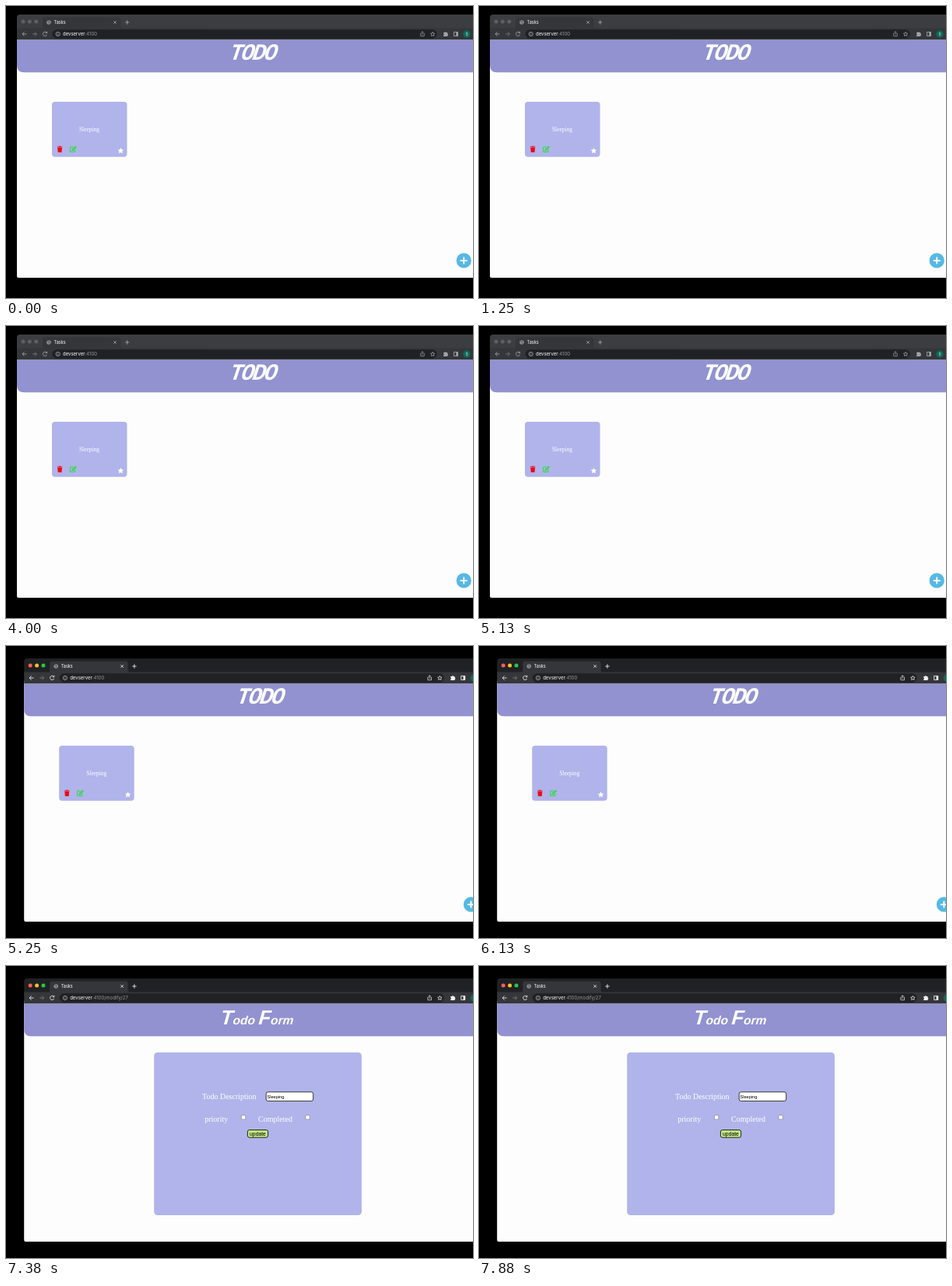
Animation, 600 px wide and 375 px high, one loop 8 s. Source, as an HTML page:

```html
<!DOCTYPE html>
<html lang="en">
<head>
<meta charset="utf-8">
<title>Todo list</title>
<style>
html, body { margin: 0; width: 100%; height: 100%; overflow: hidden; background: #000; }
svg { display: block; width: 100vw; height: 100vh; }
text { fill: #fff; }
.ui { font-family: Inter, sans-serif; }
.serif { font-family: "Liberation Serif", serif; }
.sans { font-family: "Liberation Sans", sans-serif; }
.title { font-style: italic; font-weight: 700; text-anchor: middle; }
.list-title { font: italic 700 27.5px "Noto Sans Mono", monospace; letter-spacing: -1.7px; }
.form-title { font-family: "Liberation Sans", sans-serif; font-size: 15.5px; }
.form-title .cap { font-size: 26px; }
.strip { fill: #3c3d40; }
.light { fill: #5e5f62; }
.icon { stroke: #a0a2a6; fill: none; stroke-width: .9; }
.solid { fill: #a0a2a6; }
.active .strip { fill: #202124; }
.active .red { fill: #ff5f57; }
.active .yellow { fill: #febc2e; }
.active .green { fill: #28c840; }
.active .icon.lit { stroke: #e6e7e9; }
.active .solid.lit { fill: #f1f1f2; }
.dim { stroke: #77797d; }
.panel { fill: #b0b4ea; }
.hover .card { filter: drop-shadow(0 0 2px #0005); }
.field { fill: #fff; stroke: #333; }
.check { fill: #fff; stroke: #777; stroke-width: .6; }
</style>
</head>
<body>
<svg viewBox="0 0 600 375" preserveAspectRatio="none">
  <g id="window">
    <path fill="#fdfdfd" d="M14 40H620V349H16q-2 0-2-2Z"/>
    <path class="strip" d="M14 30V15q0-4 4-4H620V30Z"/>
    <circle class="light red" cx="22" cy="20" r="2.5"/>
    <circle class="light yellow" cx="30.4" cy="20" r="2.5"/>
    <circle class="light green" cx="38.8" cy="20" r="2.5"/>
    <path fill="#35363a" d="M14 28.5H45q2 0 2-2V18q0-3.5 3.5-3.5H144q3.5 0 3.5 3.5v8.500q0 2 2 2H620V43.500H14Z"/>
    <circle cx="55" cy="21" r="2.8" fill="#8f9195"/>
    <path d="M53 20l2-1 1 2-2 1M55.500 23l1.500-1" fill="none" stroke="#45464a" stroke-width=".7"/>
    <text class="ui" x="61.500" y="23" font-size="5.5">Tasks</text>
    <path class="icon lit" d="M138.300 19.300l3.400 3.400m0-3.400l-3.400 3.400M153 21h5.400m-2.700-2.700v5.400"/>

    <path class="icon lit" d="M26.400 36H21m2.500-2.600L20.900 36l2.600 2.600"/>
    <path class="icon dim" d="M34 36h5.400m-2.500-2.600l2.600 2.600-2.600 2.600"/>
    <path class="icon lit" d="M52.200 34.400a2.600 2.600 0 1 0 .3 2.400M52.600 32.800v2h-2"/>
    <rect x="59.500" y="30.300" width="494" height="11.400" rx="5.700" fill="#202124"/>
    <g class="icon" stroke-width=".7">
      <circle cx="66.700" cy="36" r="2.600"/>
      <path d="M66.700 35.700v1.800m0-3.200v.7"/>
    </g>
    <text class="ui" x="73" y="38.200" font-size="6">devserver<tspan fill="#95989d">:4100<tspan id="route"></tspan></tspan></text>
    <path class="icon lit" d="M533.700 35h-1v3.700h4.600V35h-1M535 37v-4.200m-1.300 1.200l1.300-1.300 1.300 1.300" style="stroke-width:.7"/>
    <path class="icon lit" id="outline" style="stroke-width:.8"/>
    <path class="solid lit" d="M562 34h1.500a1.200 1.200 0 0 1 2.300 0h1.500v1.600a1.200 1.200 0 0 1 0 2.300V39H562v-1.500a1.200 1.200 0 0 0 0-2.200Z"/>
    <path class="icon lit" d="M575.500 33.500h5v5h-5Z"/>
    <path class="solid lit" d="M578.300 33.500h2.500v5h-2.500Z"/>
    <circle cx="592" cy="36" r="4.700" fill="#0b6b59"/>
    <text class="ui" x="592" y="37.900" font-size="5" text-anchor="middle">S</text>

    <path fill="#9192cf" d="M14 43.500H620V85.200H23q-9 0-9-9Z"/>

    <g id="list">
      <text class="title list-title" transform="translate(315 69) skewX(-5)">TODO</text>
      <g class="card">
        <rect class="panel" x="59" y="123" width="96.500" height="70.700" rx="4"/>
        <text class="serif" x="107" y="161" font-size="7.450" text-anchor="middle">Sleeping</text>
        <path fill="#f00914" d="M65.800 180.600h2l.5-.8h1.600l.5.8h2v1h-6.600ZM66.200 182h5.800l-.4 5.200q-.1.800-.9.800h-3.200q-.8 0-.9-.8Z"/>
        <path fill="none" stroke="#3fd659" stroke-width="1.200" d="M86.500 181.200h-3.300q-.7 0-.7.700v4.800q0 .7.700.7h4.800q.7 0 .7-.7v-2"/>
        <path fill="#3fd659" d="M84.500 186v-1.900l4.300-4.200q.5-.4 1 0l.8.800q.4.500 0 1l-4.200 4.300Z"/>
        <path id="star" fill="#fff"/>
      </g>
      <circle cx="588.200" cy="326.900" r="9.600" fill="#55b9e4"/>
      <path stroke="#fff" stroke-width="2" stroke-linecap="round" d="M584.500 326.900h7.400m-3.700-3.700v7.400"/>
    </g>

    <g id="form">
      <text class="title form-title" transform="translate(313 69.500) skewX(-5)"><tspan class="cap">T</tspan>odo <tspan class="cap">F</tspan>orm</text>
      <rect class="panel" x="181" y="106" width="266.700" height="209" rx="4.500"/>
      <g class="serif" font-size="10">
        <text x="242.800" y="165.700">Todo Description</text>
        <text x="246" y="194.700">priority</text>
        <text x="314.800" y="194.700">Completed</text>
      </g>
      <rect class="field" x="325" y="156.800" width="60.500" height="11.600" rx="2.500"/>
      <text class="sans" x="326.300" y="164.500" font-size="5.600" style="fill:#000">Sleeping</text>
      <rect class="check" x="293.300" y="186.700" width="5.200" height="5.200" rx=".7"/>
      <rect class="check" x="375.800" y="186.700" width="5.200" height="5.200" rx=".7"/>
      <rect x="301.200" y="205.600" width="26.200" height="9.600" rx="2.300" fill="#c4ea83" stroke="#222"/>
      <text class="sans" x="314.300" y="212.600" font-size="6.800" text-anchor="middle" style="fill:#000">update</text>
    </g>
  </g>
</svg>
<script>
const LOOP = 8000, FOCUS = 5250, HOVER = 7130, OPEN_FORM = 7380;
const byId = id => document.getElementById(id);
const win = byId('window'), list = byId('list'), form = byId('form'), route = byId('route');

function starPath(cx, cy, radius) {
  const points = Array.from({ length: 10 }, (_, i) => {
    const r = i % 2 ? radius * 0.48 : radius, a = i * Math.PI / 5;
    return (cx + r * Math.sin(a)).toFixed(2) + ' ' + (cy - r * Math.cos(a)).toFixed(2);
  });
  return 'M' + points.join('L') + 'Z';
}
byId('outline').setAttribute('d', starPath(548.2, 36.2, 2.9));
byId('star').setAttribute('d', starPath(147.4, 186, 4.1));

function draw() {
  const t = performance.now() % LOOP;
  const focused = t >= FOCUS, editing = t >= OPEN_FORM;
  win.setAttribute('transform', focused ? 'translate(9.2 5)' : '');
  win.classList.toggle('active', focused);
  win.classList.toggle('hover', t >= HOVER && !editing);
  list.style.display = editing ? 'none' : '';
  form.style.display = editing ? '' : 'none';
  route.textContent = editing ? '/modify/27' : '';
  requestAnimationFrame(draw);
}
draw();
</script>
</body>
</html>
```
